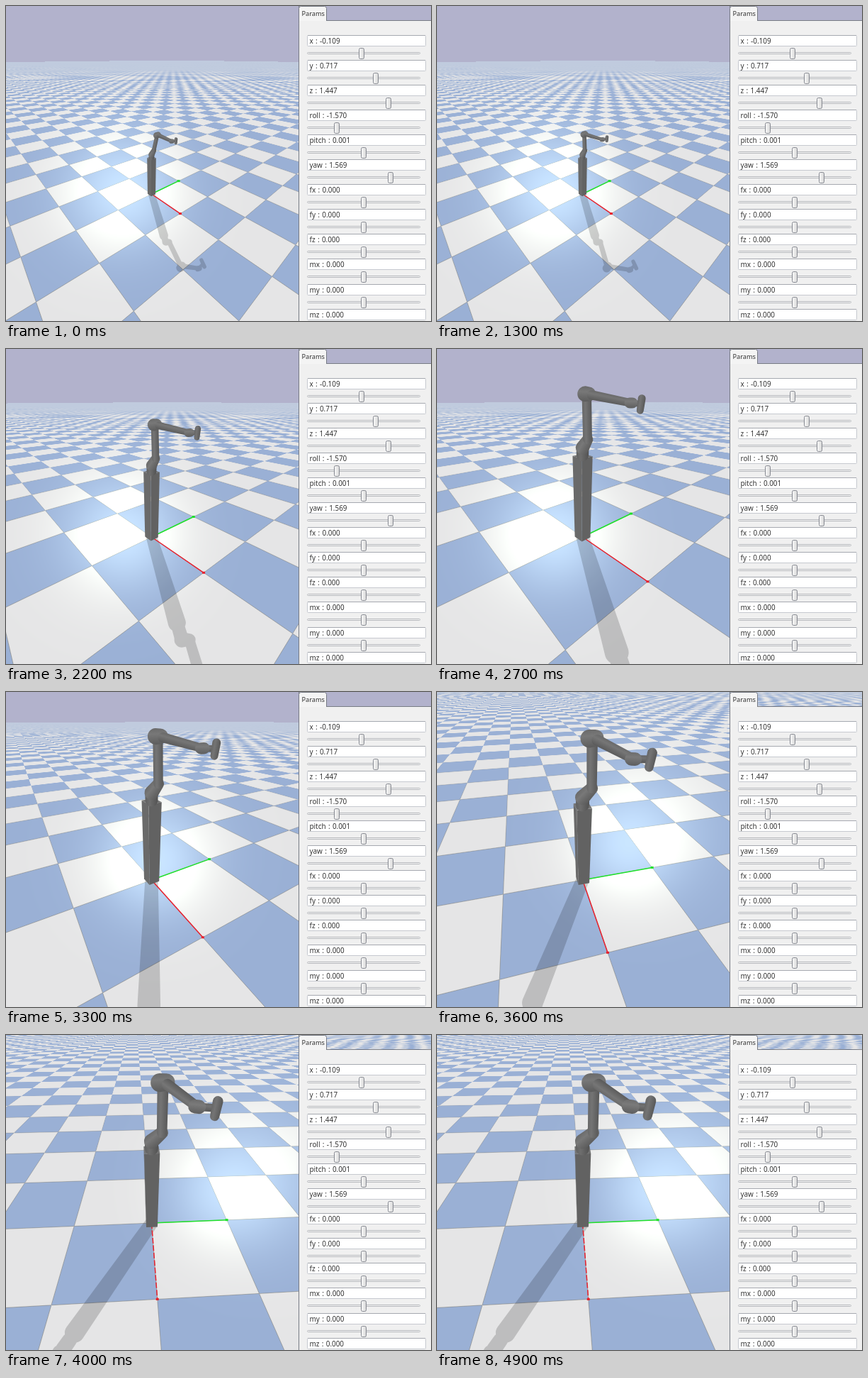
Recreate the animation shown at these times as an HTML page with a canvas. Size 600 px wide and 444 px high, loop 5 s.

```html
<!DOCTYPE html>
<html lang="en">
<head>
<meta charset="utf-8">
<title>Robot arm with parameter panel</title>
<style>
html, body { margin: 0; width: 100%; height: 100%; overflow: hidden; background: #b2b2cc; }
canvas { display: block; }
</style>
</head>
<body>
<canvas id="stage" width="600" height="444"></canvas>
<script>
const W = 600, H = 444, LOOP = 5000, STEP = 100;
const FOCAL = 275, CX = 205.5, CY = 265;
const PANEL_X = 413, TAB_H = 21, FLOOR_SIZE = 200;
const LIGHT = [-1.287, 0.754, 1];
const LIGHT_LEN = Math.hypot(...LIGHT);

const ctx = document.getElementById('stage').getContext('2d');
const image = ctx.createImageData(W, H);
const shadeCanvas = document.createElement('canvas');
shadeCanvas.width = W;
shadeCanvas.height = H;
const shadeCtx = shadeCanvas.getContext('2d');

const lerp = (a, b, k) => a + (b - a) * k;
const fract = v => v - Math.floor(v);

// Interpolates rows of [time, ...values].
function track(keys, t) {
  if (t <= keys[0][0]) return keys[0].slice(1);
  for (let i = 1; i < keys.length; i++) {
    const [p, q] = [keys[i - 1], keys[i]];
    if (t <= q[0]) {
      const k = (t - p[0]) / (q[0] - p[0]);
      return p.slice(1).map((v, j) => lerp(v, q[j + 1], k));
    }
  }
  return keys[keys.length - 1].slice(1);
}

// time, distance, yaw, pitch
const CAMERA = [
  [1400, 5, 50, 35], [1900, 3.75, 50, 35], [2400, 2.55, 50, 35],
  [3100, 2.55, 50, 35], [3600, 2.55, 76, 46], [3900, 2.55, 86.8, 47]
];
const ELBOW = [[100, 0.015, 0.145, 1.495], [1100, -0.05, 0.09, 1.51]];
const WRIST = [[100, 0.33, 0.28, 1.415], [1100, 0.31, 0.285, 1.445], [4000, 0.31, 0.285, 1.445], [4900, 0.315, 0.3, 1.447]];
const TOOL = [[100, 0.34, 0.4, 1.4], [1100, 0.32, 0.415, 1.437], [4000, 0.32, 0.415, 1.437], [4900, 0.32, 0.427, 1.44]];

let cam;
function setCamera(t) {
  const [d, yaw, pitch] = track(CAMERA, t);
  const y = yaw * Math.PI / 180, p = pitch * Math.PI / 180;
  cam = { d, yaw, a: Math.cos(y), b: -Math.sin(y), sp: Math.sin(p), cp: Math.cos(p) };
  cam.back = -d * cam.cp;
  cam.h = d * cam.sp;
}

function project([x, y, z]) {
  const r = cam.a * x - cam.b * y, g = cam.b * x + cam.a * y;
  const s = FOCAL / Math.max(0.1, cam.d + g * cam.cp - z * cam.sp);
  return { x: CX + r * s, y: CY - (g * cam.sp + z * cam.cp) * s, s };
}

// Box-filtered square wave for one floor axis.
const wave = (v, w) =>
  2 * (Math.abs(fract((v - w / 2) / 2) - 0.5) - Math.abs(fract((v + w / 2) / 2) - 0.5)) / w;

function drawFloor() {
  const { a, b, sp, cp, h, back } = cam, px = image.data;
  for (let j = 0; j < H; j++) {
    const up = (CY - j - 0.5) / FOCAL, q = sp - up * cp;
    const end = j < TAB_H ? W : PANEL_X;
    const depth = h / q, g = back + depth * (up * sp + cp);
    const dg = h / (FOCAL * q * q), dr = depth / FOCAL;
    for (let i = 0; i < end; i++) {
      const o = (j * W + i) * 4;
      let red = 178, green = 178, blue = 204;
      if (q > 0) {
        const sx = (i + 0.5 - CX) / FOCAL, r = depth * sx;
        const x = a * r + b * g, y = a * g - b * r;
        if (Math.abs(x) < FLOOR_SIZE && Math.abs(y) < FLOOR_SIZE) {
          const slant = sx * cp * dg;
          const wx = Math.max(Math.abs(a * dr), Math.abs(a * slant + b * dg));
          const wy = Math.max(Math.abs(b * dr), Math.abs(a * dg - b * slant));
          const white = 0.5 + 0.5 * wave(x, wx * 0.6) * wave(y, wy * 0.6);
          red = lerp(154, 229, white);
          green = lerp(176, 229, white);
          blue = lerp(213, 230, white);

          const near = 1 - 10 * Math.max(wx, wy);
          if (near > 0) {
            const edge = Math.min(Math.abs(x - Math.round(x)) / wx, Math.abs(y - Math.round(y)) / wy);
            const k = Math.max(0, 1 - edge) * near * 0.65;
            red = lerp(red, 130, k);
            green = lerp(green, 130, k);
            blue = lerp(blue, 125, k);
          }

          // Mirror reflection of the light off the floor
          const vx = b * back - x, vy = a * back - y;
          const dot = (-LIGHT[0] * vx - LIGHT[1] * vy + h) / (LIGHT_LEN * Math.hypot(vx, vy, h));
          if (dot > 0.75) {
            const glow = Math.pow(dot, 26);
            red += 48 * glow;
            green += 54 * glow;
            blue += 46 * glow;
          }
        }
      }
      px[o] = red;
      px[o + 1] = green;
      px[o + 2] = blue;
      px[o + 3] = 255;
    }
  }
  ctx.putImageData(image, 0, 0);
}

function capsule(c, p, q, rp, rq) {
  const ang = Math.atan2(q.y - p.y, q.x - p.x), n = Math.PI / 2;
  c.beginPath();
  c.arc(p.x, p.y, rp, ang + n, ang + 3 * n);
  c.arc(q.x, q.y, rq, ang - n, ang + n);
  c.closePath();
  c.fill();
}

function limb([A, B, ra, rb = ra, tone = 108]) {
  const p = project(A), q = project(B), rp = ra * p.s, rq = rb * q.s;
  const ang = Math.atan2(q.y - p.y, q.x - p.x);
  let nx = -Math.sin(ang), ny = Math.cos(ang);
  if (nx + ny * 0.6 > 0) { nx = -nx; ny = -ny; }
  const mx = (p.x + q.x) / 2, my = (p.y + q.y) / 2, w = Math.max(rp, rq);
  const fill = ctx.createLinearGradient(mx + nx * w, my + ny * w, mx - nx * w, my - ny * w);
  const grey = v => `rgb(${v},${v},${v})`;
  fill.addColorStop(0, grey(tone - 4));
  fill.addColorStop(0.35, grey(tone + 10));
  fill.addColorStop(1, grey(tone - 18));
  ctx.fillStyle = fill;
  capsule(ctx, p, q, rp, rq);
}

function armLinks(t) {
  const elbow = track(ELBOW, t), wrist = track(WRIST, t), tool = track(TOOL, t);
  const side = [-0.035, 0.095, 1.14];
  const shift = (p, x, y, z) => [p[0] + x, p[1] + y, p[2] + z];
  return [
    [[0, 0, 1.01], [0, 0, 1.06], 0.062, 0.062, 100],
    [[0, 0, 1.08], side, 0.068, 0.056, 110],
    [side, elbow, 0.046, 0.043, 106],
    [shift(elbow, 0.01, -0.025, 0), shift(elbow, 0, 0.025, 0), 0.07, 0.066, 110],
    [shift(elbow, 0.035, 0.03, -0.008), wrist, 0.043, 0.034, 108],
    [wrist, tool, 0.027, 0.027, 104],
    [shift(wrist, -0.005, -0.012, 0), shift(wrist, 0.005, 0.012, 0), 0.046, 0.046, 112],
    [shift(tool, 0, 0, 0.04), shift(tool, 0, 0, -0.05), 0.034, 0.032, 106]
  ];
}

function drawShadow(links) {
  const drop = ([x, y, z]) => project([x - LIGHT[0] * z, y - LIGHT[1] * z, 0]);
  const cast = ([A, B, ra, rb]) => {
    const p = drop(A), q = drop(B);
    capsule(shadeCtx, p, q, ra * p.s, rb * q.s);
  };
  shadeCtx.clearRect(0, 0, W, H);
  cast([[0, 0, 0], [0, 0, 0.97], 0.085, 0.085]);
  links.forEach(cast);
  ctx.globalAlpha = 0.17;
  ctx.drawImage(shadeCanvas, 0, 0);
  ctx.globalAlpha = 1;
}

function drawAxis(tip, color, dash) {
  const p = project([0, 0, 0]), q = project(tip);
  ctx.strokeStyle = ctx.fillStyle = color;
  ctx.lineWidth = 1.5;
  ctx.setLineDash(dash);
  ctx.beginPath();
  ctx.moveTo(p.x, p.y);
  ctx.lineTo(q.x, q.y);
  ctx.stroke();
  ctx.setLineDash([]);
  ctx.fillRect(q.x - 2, q.y - 1.5, 4, 3);
}

function face(points, color) {
  ctx.fillStyle = color;
  ctx.beginPath();
  points.map(project).forEach(p => ctx.lineTo(p.x, p.y));
  ctx.closePath();
  ctx.fill();
}

function drawColumn() {
  const s = 0.072;
  face([[-s, -s, 0], [s, -s, 0], [s, -s, 1], [-s, -s, 1]], '#6a6a6a');
  face([[s, -s, 0], [s, s, 0], [s, s, 1], [s, -s, 1]], '#626262');
  face([[-s, -s, 1], [s, -s, 1], [s, s, 1], [-s, s, 1]], '#747474');
}

const PARAMS = [
  ['x', -0.109], ['y', 0.717], ['z', 1.447], ['roll', -1.57], ['pitch', 0.001], ['yaw', 1.569],
  ['fx', 0], ['fy', 0], ['fz', 0], ['mx', 0], ['my', 0], ['mz', 0]
];

function box(x, y, w, h, r, fill, stroke) {
  ctx.beginPath();
  ctx.roundRect(x, y, w, h, r);
  ctx.fillStyle = fill;
  ctx.fill();
  ctx.strokeStyle = stroke;
  ctx.stroke();
}

function label(text, x, y, size) {
  ctx.font = `${size}px "Noto Sans", "Open Sans", sans-serif`;
  ctx.wordSpacing = '0.8px';
  ctx.fillStyle = '#333';
  ctx.fillText(text, x, y);
}

function drawPanel() {
  ctx.lineWidth = 1;
  ctx.fillStyle = '#f0f0f0';
  ctx.fillRect(PANEL_X, TAB_H, W - PANEL_X, H - TAB_H);
  ctx.fillStyle = '#777b85';
  ctx.fillRect(PANEL_X, 0, 1, H);
  ctx.fillRect(453, TAB_H - 1, W - 453, 1);
  box(413.5, 0.5, 39, 24, [3, 3, 0, 0], '#f4f4f4', '#777b85');
  ctx.fillStyle = '#f0f0f0';
  ctx.fillRect(414, TAB_H, 42, 6);
  label('Params', 417.5, 13.5, 9.2);

  PARAMS.forEach(([name, value], i) => {
    const y = Math.round(i * 35.05);
    box(425.5, y + 41.5, 167, 15, 1, '#fff', '#c6c9cf');
    ctx.fillStyle = '#a6a9b0';
    ctx.fillRect(426, y + 41, 166, 1);
    label(`${name} : ${value.toFixed(3)}`, 428.5, y + 52.5, 9.9);
    box(425.5, y + 65.5, 159, 2, 1, '#fafafa', '#b4b6ba');
    const knob = Math.round(504.9 + 24.05 * value);
    const fill = ctx.createLinearGradient(knob - 4, 0, knob + 4, 0);
    fill.addColorStop(0, '#fbfbfb');
    fill.addColorStop(1, '#d6d6d6');
    box(knob - 3.5, y + 59.5, 7, 15, 2, fill, '#858890');
  });
}

function draw(t) {
  setCamera(t);
  const links = armLinks(t);
  drawFloor();
  drawShadow(links);
  drawAxis([1, 0, 0], '#e8202c', cam.yaw > 82 ? [8, 2.5] : []);
  drawAxis([0, 1, 0], '#1fe02a', []);
  drawColumn();
  links.forEach(limb);
  drawPanel();
}

let shown = -1;
function tick(now) {
  const t = Math.floor((now % LOOP) / STEP) * STEP;
  if (t !== shown) draw(shown = t);
  requestAnimationFrame(tick);
}
tick(performance.now());
</script>
</body>
</html>
```
